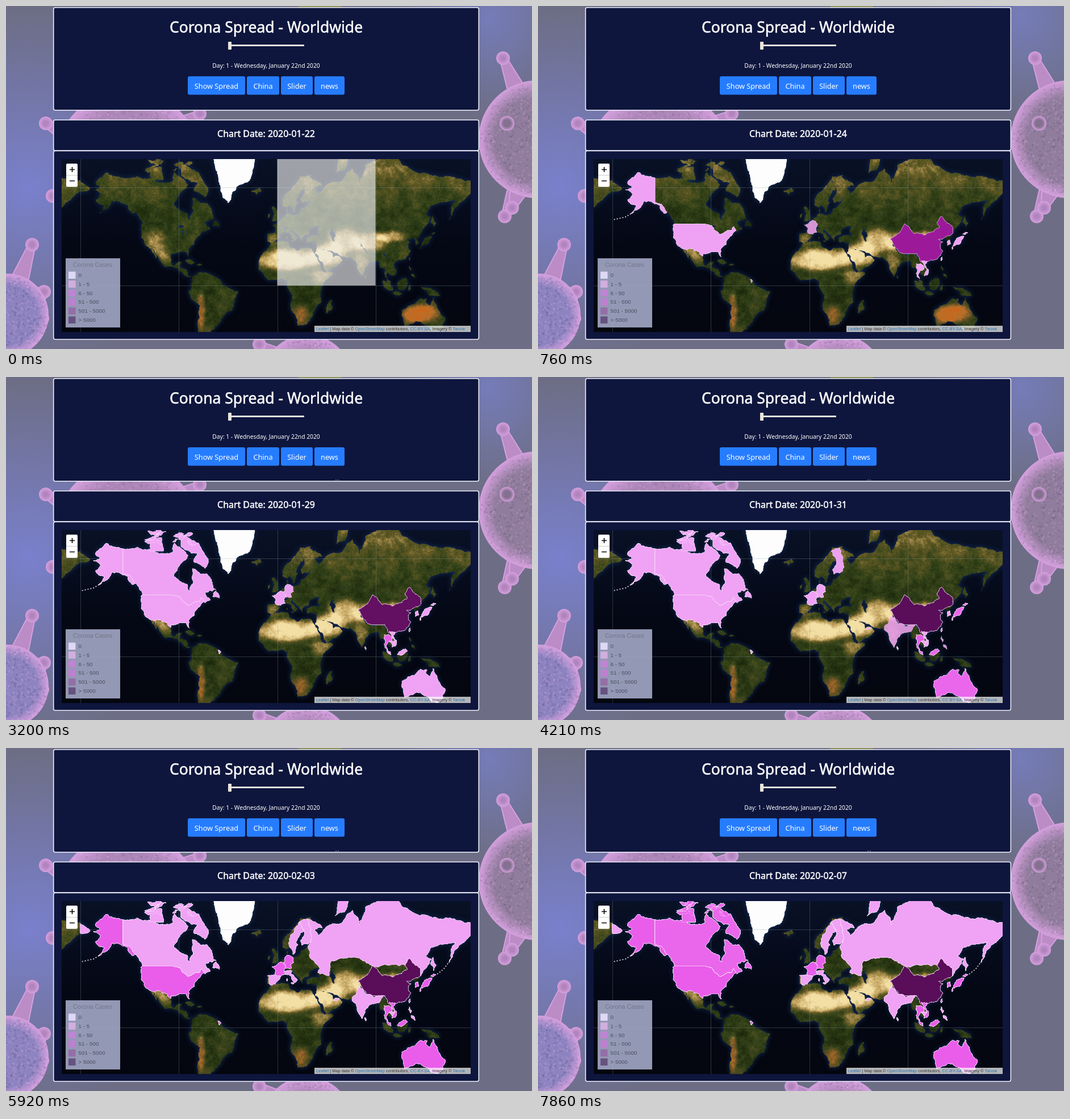
Animation, 926 px wide and 605 px high, one loop 8000 ms. Source, as an HTML page with a canvas:

```html
<!DOCTYPE html>
<html lang="en">
<head>
<meta charset="utf-8">
<title>Corona Spread - Worldwide</title>
<style>
html, body { margin: 0; width: 100%; height: 100%; overflow: hidden; background: #0e163d; }
canvas, svg { position: absolute; left: 0; top: 0; width: 926px; height: 605px; }
.ui { font-family: "Noto Sans", "Open Sans", sans-serif; fill: #fff; text-anchor: middle; }
.heavy { stroke: #fff; stroke-width: .5px; }
.map { font-family: "Liberation Sans", Arial, sans-serif; }
</style>
</head>
<body>
<canvas id="stage" width="926" height="605"></canvas>
<svg viewBox="0 0 926 605">
  <g class="ui">
    <text class="heavy" x="458" y="47" font-size="26.5">Corona Spread - Worldwide</text>
    <rect x="391" y="68" width="134" height="3" rx="1" fill="#e4e2de"/>
    <rect x="391" y="63" width="6" height="14" rx="1" fill="#e8e4dc"/>
    <text x="458" y="109" font-size="10.3">Day: 1 - Wednesday, January 22nd 2020</text>
    <g id="buttons" font-size="12.7"></g>
    <text class="heavy" id="date" x="458" y="231" font-size="15.9"></text>
    <path id="dots" d="M580 181.5h2M584 181.5h2" stroke="#8d93ad"/>
  </g>
  <g class="map">
    <rect x="106" y="278" width="20" height="41" rx="2" fill="#fff"/>
    <path d="M106 298.5h20" stroke="#ccc"/>
    <path d="M112 288.5h9M116.5 284v9M112 308.5h9" stroke="#000" stroke-width="1.6"/>
    <rect x="105" y="445" width="96" height="122" fill="#aab0d0" fill-opacity=".86"/>
    <text x="152.5" y="460" font-size="10.8" fill="#737689" text-anchor="middle">Corona Cases</text>
    <g id="legend" font-size="9.8" fill="#4c4f62"></g>
    <rect x="543" y="564" width="275" height="11" fill="#fff" fill-opacity=".7"/>
    <text x="546" y="572" font-size="7.4" fill="#333"><tspan fill="#2672b0">Leaflet</tspan> | Map data © <tspan fill="#2672b0">OpenStreetMap</tspan> contributors, <tspan fill="#2672b0">CC-BY-SA</tspan>, Imagery © <tspan fill="#2672b0">Tarvok</tspan></text>
  </g>
</svg>
<script>
const W = 926, H = 605, LOOP = 8000, DAY = 500;
const map = { x: 98, y: 270, w: 720, h: 305 };
const $ = id => document.getElementById(id);

// Key points as "longitude latitude"; two points make a slim island
const outlines = {
  alaska: '-141 60.3,-141 69.7,-157 71.3,-166 68.3,-162 66.5,-168 65.6,-161 64,-166 61.5,-158 58.6,-163 54.8,-154 58,-151 61,-146 60.8,-139 59.5,-133 55,-130 55.5,-135 59.5',
  usa: '-123 49,-95 49,-89 48,-82.5 42.5,-79 43,-75 45,-71 45,-69 47.4,-67 44.8,-70.5 42,-76 37,-76 35,-81 31.5,-80.3 25.2,-83 29.5,-90 29.5,-97.3 27.8,-97.3 25.9,-102 29.8,-106.5 31.8,-117.1 32.5,-120.6 34.6,-124.3 40.4,-124.5 48.3',
  canada: '-141 60.3,-141 69.7,-128 70.3,-108 68,-95 69,-94 71.5,-85.5 69.3,-81.5 67.5,-87 65,-94.7 59,-82.3 55,-80 51.2,-76.6 56.2,-77.5 62.4,-70 60,-64.5 60.2,-56 52.2,-66 50.2,-64.5 47.5,-61 46,-66 44,-67 44.8,-69 47.4,-71 45,-75 45,-79 43,-82.5 42.5,-89 48,-95 49,-123 49,-130 55.5,-135 59.5',
  baffin: '-63 66,-66 62.5,-76 65,-73 68,-88 70.5,-88 73.5,-72 71.5',
  newfoundland: '-59 48,-53 47,-56 51.5',
  victoria: '-117 69,-104 69,-106 73,-116 72',
  iceland: '-24 65,-19 63.4,-14 65,-17 66.3',
  mexico: '-117.1 32.5,-106.5 31.8,-102 29.8,-97.3 25.9,-97.5 21,-94 18,-90.5 21,-87 21.4,-88.5 16,-83.3 15,-82 9,-77.3 8.5,-83 8.2,-94 16,-105.5 20,-113 31,-109.6 23',
  southAmerica: '-77.3 8.5,-72 12,-62 10.5,-51 4.2,-50 .5,-35.2 -5.5,-39 -13,-41 -22,-48 -26,-57 -37,-65 -41,-74 -41,-70.4 -18.3,-76.2 -14,-81 -5,-77.5 4',
  guiana: '-54 5.8,-51.5 4.2,-53 2.2',
  cuba: '-84.5 22,-75 20.5', hispaniola: '-74 19,-68.5 18.5',
  africa: '-6 35.8,10 37.2,11 34,20 30.5,22 32.7,32 31.2,39.5 15.5,43.3 11.5,51 11.8,40 -4,40.5 -15,35 -20,32.5 -27,27 -33.5,18.5 -34.5,12 -18,13.5 -11,9 -1,9 4,4 6.4,-7.5 4.4,-17 14.5,-17 21.5,-9.8 30',
  madagascar: '50 -13,45.5 -25.5',
  arabia: '34.5 28,36 32,48 30,51 25,56.3 26,59.8 22.5,55 17.5,45 12.8,42.5 16.5',
  emirates: '51.5 24.2,56.3 25.5',
  westAsia: '37 45,48 47,50 52,71 54,87 49.1,80 42,76 30,70 22.5,66.7 25.2,57 26.5,50 30,36 31,36 36.5,27.5 36.8,27 40,35 42,41 41.5',
  europe: '2 51,8 53.8,19 54.4,22 57.5,28 59.5,40 58,39 47.2,31 46.3,28.5 42,23 40.3,23 37,19.4 41.5,13.6 46,7.5 47.5',
  spain: '-9 43,-1.7 43.4,3.2 42.4,-.5 38.6,-2 36.8,-5.5 36.1,-7.4 37.2,-7 41.8',
  portugal: '-9 43,-7 41.8,-7.4 37.2,-9 37',
  france: '-1.7 43.4,-1.2 46,-4.7 48.4,2 51,8 49,6 46.2,7.5 43.8,3.2 42.4',
  germany: '7 53.5,9 55,14.2 53.9,15 51,12.3 50.2,13 47.6,7.5 47.5,8 49,6 51',
  italy: '7.5 43.8,6.8 45.8,13.6 46,12.5 44.3,18.4 40.2,16 38,10.4 43.6',
  sicily: '12.5 37.7,15.5 37.4', sardinia: '9 41,9 39',
  norway: '5 59,5 62,13 66,21 70.2,31 70.3,20 69,12 64,11.5 59,8 58',
  sweden: '11.5 59,12 64,20 69,24 65.8,17.2 61.5,18.8 60,14.3 55.5',
  finland: '20 69,28 69.9,31.5 62.8,28 60.5,22.5 60,21.3 62,25 65',
  denmark: '9 55,9.5 57.5',
  britain: '-5 50.3,1.5 52,-3 58.5,-5 58,-3 54', ireland: '-9 52,-6.5 55',
  russia: '31 69.7,41 67,34 66.3,38 64,44 67,60 69,69 72.5,75 68,81 73.5,100 76.5,113 74,130 71,160 70,180 69,180 65,163 58,157 51,163 61.5,142 59,135.5 54.8,141 53,131 42.6,131 47,121 53.3,117 49.6,87 49.1,71 54,50 52,48 47,47.5 43,37 45,39 47.2,31 53,28 59.5,31.5 62.8,28 69.9',
  chukotka: '-180 68.5,-171 66,-180 65', sakhalin: '142.5 54,143 46', novaya: '53 71,67 76.5',
  mongolia: '87 49.1,117 49.6,119 46.8,105 41.7,96 42.7',
  china: '74 39.5,80 42,87 49.1,96 42.7,105 41.7,119 46.8,117 49.6,121 53.3,131 47,130.5 42.5,121.5 39,118 39,122 37,119.5 35,122 30,117 23.5,108 21.6,101.5 21.3,98.5 28,86 28,78.5 33',
  india: '74 34.5,78.5 33,81 29,88 26.5,97 28,92 22,87 21.3,80 15,77.5 8.1,73 17,72 21,68.5 23.7,70 28',
  lanka: '80.3 9.3,81 6',
  indochina: '92 22,97 28,101.5 21.3,108 21.6,106 19,109 12,105 8.7,101 13,99 10,98 16,94 16',
  thailand: '98 19.5,104 18,105 15,101 13,99.3 9.3,101 6.5,98.5 8,98.8 15',
  vietnam: '102.5 22.4,108 21.6,105.8 19,109 14.5,109 11.8,105 8.7,107.5 14',
  cambodia: '102.5 14,107.5 14,105 10.5',
  malaya: '100.3 6.5,104 1.5',
  sabah: '109.7 2,117 7,119 5,114.5 1.5',
  borneo: '109.7 2,117 7,119 5,116 -3.8,110.5 -2.8',
  sumatra: '95.3 5.6,105.5 -5.5', java: '105.5 -6.7,114.4 -8.2', sulawesi: '120 -5,122 1',
  guinea: '131 -1,138 -2,147 -6,150 -10.5,138 -8',
  luzon: '120.8 18.5,122 13', mindanao: '122.5 11,126 6.5', taiwan: '121.4 25.2,120.7 22',
  honshu: '131 34,141.5 41', hokkaido: '140.3 42.5,145 43.5', kyushu: '131 33.5,130.7 31.3',
  korea: '126.5 37.8,128.4 38.5,129.3 35.5,126.3 34.5',
  northKorea: '124.3 40,130.5 42.5,127.5 39.5,128.4 38.5,126.5 37.8',
  australia: '114 -22,115.7 -32,116.5 -35,124 -33,131 -31.5,138 -34.5,140.5 -38,146.3 -39,150 -37.3,153.5 -28.5,146 -19,142.5 -10.8,140 -17.7,135.6 -15,137 -12.2,131 -11.5,122.2 -17.5',
};
const iceSheet = '-58 76,-54 70,-50 62.5,-45 60,-40 65,-24 69.5,-20 76';
const lakes = ['52 37,49.5 46.5', '-91 47.5,-85 47.5', '-87 42,-86 46'];

// Dry regions: longitude, latitude, their half sizes in degrees, strength
const deserts = [
  [8, 23, 27, 9, .8], [46, 27, 17, 9, .75], [62, 38, 17, 9, .62], [86, 37, 15, 7, .62], [105, 41, 14, 4, .5],
  [-111, 36, 9, 10, .45], [-103, 26, 6, 6, .35], [-70, -22, 4, 15, .5], [22, -26, 8, 9, .42], [131, -25, 17, 8, .7],
  [-4, 39, 6, 4, .4], [40, 8, 10, 8, .3], [76, 21, 7, 11, .28],
];
const ramp = ['#1b280b', '#324118', '#625a25', '#c0a05c', '#f3dfa4'];
const rustRamp = ['#1b280b', '#35421a', '#655223', '#b8702b', '#cc6418'];

// Outlines, then pairs of first day and legend class
const spread = [
  ['china', 0, 4, 6, 5], ['usa alaska', 0, 1, 9, 2], ['honshu hokkaido kyushu', 0, 1, 8, 2],
  ['thailand', 0, 1, 4, 2], ['korea', 0, 1, 9, 2], ['taiwan', 0, 1, 6, 2], ['vietnam', 1, 1, 10, 2],
  ['france guiana', 2, 1, 10, 2], ['malaya sabah', 3, 1, 8, 2],
  ['canada newfoundland baffin victoria arctic', 4, 1, 16, 2],
  ['australia', 4, 1, 8, 2], ['germany', 5, 1, 10, 2], ['cambodia lanka', 5, 1],
  ['finland emirates', 7, 1], ['india luzon mindanao', 8, 1],
  ['italy sicily sardinia sweden russia chukotka sakhalin novaya', 9, 1], ['spain', 10, 1],
];
const shades = ['', '#f0a2f5', '#e95eea', '#c33cc3', '#9c1a9a', '#5a0d59'];
const chains = [{ first: 0, pts: '-163 54.8,-168 53,-179 51.5' }, { first: 9, pts: '156 50.5,152 47,146 43.8' }];

const project = (lon, lat) => [477.5 + lon * 1.926, 493 - 110.35 * Math.log(Math.tan(Math.PI / 4 + lat * Math.PI / 360))];
const unproject = (x, y) => [(x - 477.5) / 1.926, Math.atan(Math.exp((493 - y) / 110.35)) * 360 / Math.PI - 90];
const parse = s => s.split(',').map(p => project(...p.split(' ').map(Number)));
const hash = (x, y) => { const v = Math.sin(x * 12.9898 + y * 78.233) * 43758.5453; return v - Math.floor(v) - .5; };

// Splits an edge into a rough coast; the result is the same from either end
function roughen(a, b, out) {
  const len = Math.hypot(b[0] - a[0], b[1] - a[1]);
  if (len < 3 || a[0] === b[0] || a[1] === b[1]) return out.push(b);
  const mx = (a[0] + b[0]) / 2, my = (a[1] + b[1]) / 2, amp = Math.min(len * .35, 5);
  const mid = [mx + hash(mx, my) * amp, my + hash(my, mx) * amp];
  roughen(a, mid, out);
  roughen(mid, b, out);
}
function widen([a, b]) {
  const dx = (b[0] - a[0]) * .2, dy = (b[1] - a[1]) * .2;
  return [a, [a[0] + 2 * dx - dy, a[1] + 2 * dy + dx], b, [b[0] - 2 * dx + dy, b[1] - 2 * dy - dx]];
}
function shape(s) {
  let pts = parse(s);
  if (pts.length === 2) pts = widen(pts);
  const out = [], path = new Path2D();
  pts.forEach((p, i) => roughen(p, pts[(i + 1) % pts.length], out));
  out.forEach(p => path.lineTo(...p));
  path.closePath();
  return path;
}
function scatter(count) {
  const path = new Path2D();
  for (let i = 0; i < count; i++) {
    const lon = -101 + hash(i, 3) * 46, lat = 73.4 + hash(i, 8) * 3.4;
    path.addPath(shape(`${lon} ${lat},${lon + 7 + hash(i, 5) * 6} ${lat + hash(i, 6) * 3}`));
  }
  return path;
}
function line(s) {
  const path = new Path2D();
  parse(s).forEach(p => path.lineTo(...p));
  return path;
}
function layer() {
  const c = document.createElement('canvas');
  c.width = W; c.height = H;
  return c.getContext('2d');
}
function clipMap(g) { g.beginPath(); g.rect(map.x, map.y, map.w, map.h); g.clip(); }

const shapes = {};
for (const k in outlines) shapes[k] = shape(outlines[k]);
shapes.arctic = scatter(16);

function noise(x, y) {
  const ix = Math.floor(x), iy = Math.floor(y), u = x - ix, v = y - iy;
  const mix = (a, b, t) => a + (b - a) * t * t * (3 - 2 * t);
  return mix(mix(hash(ix, iy), hash(ix + 1, iy), u), mix(hash(ix, iy + 1), hash(ix + 1, iy + 1), u), v);
}
const toRgb = c => [1, 3, 5].map(i => parseInt(c.slice(i, i + 2), 16));
const tones = ramp.map(toRgb), rustTones = rustRamp.map(toRgb);

function ground(x, y) {
  const [lon, lat] = unproject(x, y);
  let dry = .2 + Math.min(.28, Math.max(0, lat - 57) * .022);
  dry += noise(x / 24, y / 24) * .25 + noise(x / 8, y / 8) * .2 + noise(x / 2.5, y / 2.5) * .16;
  for (const [cx, cy, rx, ry, power] of deserts) {
    const d = ((lon - cx) / rx) ** 2 + ((lat - cy) / ry) ** 2;
    dry += power * Math.exp(-d * d);
  }
  const set = lat < -10 ? rustTones : tones, v = Math.min(.999, Math.max(0, dry)) * 4, i = Math.floor(v);
  return set[i].map((c, k) => c + (set[i + 1][k] - c) * (v - i));
}

function drawLand() {
  const g = layer();
  for (const k in shapes) g.fill(shapes[k]);
  g.translate(-360 * 1.926, 0);
  g.fill(shapes.russia);
  g.setTransform(1, 0, 0, 1, 0, 0);
  g.globalCompositeOperation = 'destination-out';
  lakes.forEach(s => g.fill(shape(s)));
  g.globalCompositeOperation = 'source-over';
  const img = g.getImageData(map.x, map.y, map.w, map.h);
  for (let i = 0; i < img.data.length; i += 4) {
    if (img.data[i + 3]) img.data.set(ground(map.x + i / 4 % map.w, map.y + Math.floor(i / 4 / map.w)), i);
  }
  g.clearRect(0, 0, W, H);
  g.putImageData(img, map.x, map.y);
  g.fillStyle = '#fdfdfd';
  g.fill(shape(iceSheet));
  return g.canvas;
}

function glow(g, x, y, r, inner, outer, from = 0) {
  const grad = g.createRadialGradient(x, y, r * from, x, y, r);
  grad.addColorStop(0, inner);
  grad.addColorStop(1, outer);
  g.fillStyle = grad;
  g.beginPath(); g.arc(x, y, r, 0, 7); g.fill();
}
function virus(g, x, y, r, core, ...tips) {
  const rim = '#d5a0de';
  for (const [tx, ty] of tips) {
    const len = Math.hypot(tx - x, ty - y), nx = (y - ty) / len, ny = (tx - x) / len;
    const bx = x + (tx - x) * r * .95 / len, by = y + (ty - y) * r * .95 / len;
    g.beginPath();
    for (const [px, py, w] of [[bx, by, 15], [tx, ty, 6], [tx, ty, -6], [bx, by, -15]]) g.lineTo(px + nx * w, py + ny * w);
    g.fillStyle = '#bb8cc6';
    g.strokeStyle = rim;
    g.lineWidth = 2;
    g.fill(); g.stroke();
    glow(g, tx, ty, 12, '#b184bd', rim, .3);
  }
  glow(g, x, y, r, core, rim, .72);
  for (let i = 0; i < r * 9; i++) {
    const a = hash(i, 2) * 6.28, d = Math.sqrt(hash(i, 4) + .5) * (r - 2);
    g.fillStyle = i % 2 ? 'rgba(240,190,245,.16)' : 'rgba(60,50,80,.13)';
    g.fillRect(x + Math.cos(a) * d, y + Math.sin(a) * d, 3, 3);
  }
}

function drawScene() {
  const g = layer();
  g.fillStyle = '#6d6e86';
  g.fillRect(0, 0, W, H);
  glow(g, 40, 320, 310, '#7a80cc', '#7a80cc00');
  glow(g, 850, 20, 170, '#757cb8', '#757cb800');
  g.fillStyle = '#8b8b58';
  g.fillRect(515, 0, 75, 3);
  virus(g, 215, 278, 130, '#ad86b8', [70, 207], [341, 190], [82, 335]);
  virus(g, 2, 545, 73, '#8d83c0', [46, 421], [67, 504], [64, 551]);
  virus(g, 936, 235, 104, '#907c9c', [875, 92], [878, 371], [891, 356]);
  virus(g, 530, 660, 80, '#b48cbf', [446, 597]);
  glow(g, 882, 207, 13, '#84708f', '#d5a0de', .5);
  g.fillStyle = '#0e163d';
  g.strokeStyle = '#eef0fa';
  g.lineWidth = 1.6;
  for (const [y, h] of [[2.8, 181], [201, 54], [255.5, 332.5]]) {
    g.beginPath(); g.roundRect(83.7, y, 748.6, h, 3); g.fill(); g.stroke();
  }
  clipMap(g);
  const sea = g.createLinearGradient(0, map.y, 0, map.y + map.h);
  sea.addColorStop(0, '#091126');
  sea.addColorStop(.5, '#040815');
  sea.addColorStop(1, '#04060f');
  g.fillStyle = sea;
  g.fillRect(map.x, map.y, map.w, map.h);
  g.shadowColor = '#15305c';
  g.shadowBlur = 8;
  g.drawImage(drawLand(), 0, 0);
  g.shadowBlur = 0;
  g.fillStyle = 'rgba(140,160,155,.3)';
  for (let i = -2; i < 2; i++) g.fillRect(Math.round(477.5 + i * 173.3), map.y, 1, map.h);
  for (let i = 0; i < 2; i++) g.fillRect(map.x, 493 - i * 173, map.w, 1);
  return g.canvas;
}

const scene = drawScene(), stage = $('stage').getContext('2d');
const chainLines = chains.map(c => ({ first: c.first, path: line(c.pts) }));

// Each day lays another translucent sheet over the former ones
function drawMap(days) {
  stage.drawImage(scene, 0, 0);
  stage.save();
  clipMap(stage);
  stage.lineWidth = .8;
  stage.strokeStyle = 'rgba(255,240,255,.45)';
  for (const [names, first, shade, later, laterShade] of spread) {
    for (let d = first; d < days; d++) {
      stage.fillStyle = shades[d >= later ? laterShade : shade];
      for (const name of names.split(' ')) {
        stage.globalAlpha = .86;
        stage.fill(shapes[name]);
        stage.globalAlpha = 1;
        stage.stroke(shapes[name]);
      }
    }
  }
  stage.strokeStyle = '#f6e6f8';
  stage.lineWidth = 1.6;
  stage.setLineDash([2, 3]);
  chainLines.forEach(c => { if (days > c.first) stage.stroke(c.path); });
  stage.restore();
}
function drawTile(alpha) {
  stage.fillStyle = `rgba(238,238,238,${alpha})`;
  stage.fillRect(477.5, map.y, 173, 223);
}

let left = 320;
$('buttons').innerHTML = [[101, 'Show Spread'], [57, 'China'], [56, 'Slider'], [53, 'news']].map(([w, s]) => {
  const x = left;
  left += w + 3;
  return `<rect x="${x}" y="124" width="${w}" height="32.5" rx="3" fill="#267cff"/><text x="${x + w / 2}" y="145.5">${s}</text>`;
}).join('');
$('legend').innerHTML = [['#ded7f6', '0'], ['#d2aede', '1 - 5'], ['#c084d3', '6 - 50'], ['#be80d0', '51 - 500'], ['#956ea7', '501 - 5000'], ['#66527f', '&gt; 5000']].map(([c, s], i) =>
  `<rect x="110" y="${468.5 + i * 15.8}" width="12.5" height="12.5" fill="${c}"/><text x="127.5" y="${478 + i * 15.8}">${s}</text>`).join('');

let shown = '';
function render(t) {
  const dayAt = time => Math.max(0, Math.floor((time + 325) / DAY));
  const day = dayAt(t), days = t < 140 ? 0 : dayAt(t - 75) + 1;
  const fade = t < 60 ? .65 : t < 140 ? .3 : 0;
  const state = [day, days, fade, t >= 2730].join();
  if (state === shown) return;
  shown = state;
  drawMap(days);
  if (fade) drawTile(fade);
  $('date').textContent = 'Chart Date: ' + new Date(Date.UTC(2020, 0, 22 + day)).toISOString().slice(0, 10);
  $('dots').style.display = t >= 2730 ? '' : 'none';
}

const start = performance.now();
function tick() {
  render((performance.now() - start) % LOOP);
  requestAnimationFrame(tick);
}
tick();
</script>
</body>
</html>
```
